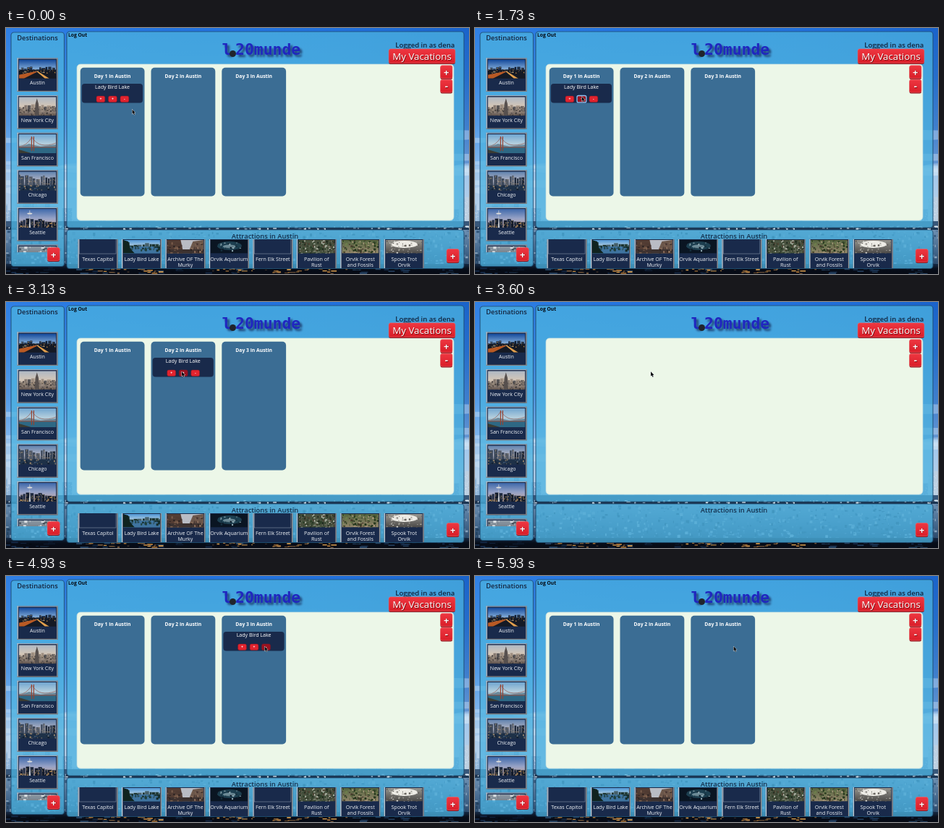
An HTML page with a canvas that plays this animation: 640x340 px, repeating every 5990 ms.

```html
<!DOCTYPE html>
<html lang="en">
<head>
<meta charset="utf-8">
<title>Trip planner</title>
<style>
html, body { margin: 0; width: 100%; height: 100%; overflow: hidden; background: #1766d2; }
canvas { display: block; width: 640px; height: 340px; }
</style>
</head>
<body>
<canvas id="stage"></canvas>
<script>
const W = 640, H = 340, LOOP = 5990;
const NAVY = '#192a4b', RED = '#e2242f', SANS = '"Open Sans", "Noto Sans", sans-serif';
const stage = document.getElementById('stage');
const scale = window.devicePixelRatio || 1;
let g;

function layer(canvas) {
  canvas.width = W * scale;
  canvas.height = H * scale;
  const c = canvas.getContext('2d');
  c.scale(scale, scale);
  return c;
}

function random(seed) {
  return () => (seed = (seed * 16807) % 2147483647) / 2147483647;
}

function rect(x, y, w, h, fill) {
  g.fillStyle = fill;
  g.fillRect(x, y, w, h);
}

function round(x, y, w, h, r, fill, stroke, line = 1) {
  g.beginPath();
  g.roundRect(x, y, w, h, r);
  if (fill) { g.fillStyle = fill; g.fill(); }
  if (stroke) { g.strokeStyle = stroke; g.lineWidth = line; g.stroke(); }
}

function shape(fill, ...pts) {
  g.beginPath();
  for (let i = 0; i < pts.length; i += 2) g.lineTo(pts[i], pts[i + 1]);
  g.closePath();
  g.fillStyle = fill;
  g.fill();
}

function oval(x, y, rx, ry, fill) {
  g.beginPath();
  g.ellipse(x, y, rx, ry, 0, 0, 7);
  g.fillStyle = fill;
  g.fill();
}

function text(s, x, y, size, fill, weight = 400, align = 'center', family = SANS) {
  g.font = `${weight} ${size}px ${family}`;
  g.textAlign = align;
  g.fillStyle = fill;
  g.fillText(s, x, y);
}

function stops(f, colors) {
  colors.forEach((c, i) => f.addColorStop(i / (colors.length - 1), c));
  return f;
}

const fade = (y0, y1, ...colors) => stops(g.createLinearGradient(0, y0, 0, y1), colors);

function clip(x, y, w, h, draw) {
  g.save();
  g.beginPath();
  g.rect(x, y, w, h);
  g.clip();
  draw();
  g.restore();
}

function towers(x, base, w, min, max, seed, colors, light) {
  const r = random(seed);
  for (let p = x; p < x + w;) {
    const bw = 2 + r() * (w > 100 ? 12 : 4), bh = min + r() * (max - min);
    rect(p, base - bh, bw, bh, colors[Math.floor(r() * colors.length)]);
    for (let k = 0; light && k < bh * bw / 14; k++)
      rect(p + r() * bw, base - r() * bh, .8, .8, light);
    p += bw + r() * 1.5;
  }
}

function specks(x, y, w, h, n, seed, colors, size = 2, flat = 1) {
  const r = random(seed);
  for (let i = 0; i < n; i++)
    rect(x + r() * w, y + r() * h, (.5 + r() * size) * flat, .5 + r() * size, colors[Math.floor(r() * colors.length)]);
}

function city() {
  rect(0, 0, W, H, fade(0, 270, '#2272de', '#3583df', '#5a9ce2', '#a3c8ec', '#bdd3e8'));
  rect(0, 0, W, 190, stops(g.createLinearGradient(0, 0, W, 0),
    ['rgba(80,160,245,.3)', 'rgba(40,120,225,0)', 'rgba(10,70,165,.35)']));
  g.globalAlpha = .4;
  const r = random(77);
  for (let i = 0; i < 26; i++) oval(r() * W, 145 + r() * 80, 20 + r() * 55, 2 + r() * 5, '#d5e6f6');
  g.globalAlpha = 1;
  towers(0, 272, W, 6, 45, 12, ['#8fb4d8', '#a9c5de', '#86a9cf', '#bdd0e2'], '#e6eef5');
  rect(0, 267, W, 12, '#38577a');
  rect(0, 276, W, 3, '#1b3552');
  specks(0, 273, W, 4, 170, 41, ['#d8e5ee', '#8ba9c2', '#20334c'], 2, 2);
  rect(0, 279, W, 61, fade(279, 340, '#6d90b2', '#41658a', '#1c3350'));
  specks(0, 280, W, 46, 900, 5, ['#56779b', '#7895b3', '#34587c', '#8aa5bd', '#24425f'], 4);
  rect(0, 326, W, 14, fade(326, 340, '#162a45', '#070d19', '#060a14'));
  specks(0, 331, W, 8, 90, 19, ['#132642', '#050911', '#24405f'], 2, 5);
  specks(110, 332, 110, 7, 22, 33, ['#a87337', '#70543a', '#d49a4c'], 1.5, 4);
  specks(285, 332, 185, 7, 36, 57, ['#a87337', '#70543a', '#d49a4c'], 1.5, 4);
}

function road(x, y, w, h) {
  rect(x, y, w, h, fade(y, y + h, '#12489a', '#7fa9d6', '#1a2234'));
  towers(x, y + 15, w, 1, 8, 8, ['#1d2d45', '#304663', '#121d30'], '#f1c67c');
  rect(x, y + 14, w, h, '#151a25');
  specks(x, y + 13, w, 6, 35, 9, ['#c58c48', '#3b506d', '#e3c08a'], 1);
  shape('#b95a25', x, y + 21, x + 24, y + 16, x + 25, y + 17, x + 7, y + h, x, y + h);
  shape('#e2a04e', x + 24, y + 16, x + 26, y + 16, x + 42, y + h, x + 36, y + h);
}

function manhattan(x, y, w, h) {
  rect(x, y, w, h, fade(y, y + h, '#aeb8c4', '#d5c7b7', '#5b4f4a'));
  towers(x, y + 20, w, 4, 10, 9, ['#82776f', '#6d6663', '#9c8d80', '#595758'], '#c7b08e');
  specks(x, y + 14, w, 13, 130, 14, ['#4a423f', '#75685e', '#92806f', '#373435']);
  shape('#57504e', x + 22, y + h, x + 23, y + 9, x + 25, y + 2, x + 27, y + 9, x + 28, y + h);
}

function bridge(x, y, w, h) {
  rect(x, y, w, h, fade(y, y + h, '#6fa5d0', '#b5cfdd', '#33718e'));
  shape('#6c8798', x, y + 18, x + 14, y + 13, x + 30, y + 17, x + w, y + 14, x + w, y + 20, x, y + 20);
  rect(x, y + 18, w, 9, '#2e6884');
  g.strokeStyle = '#8c4a3e';
  g.lineWidth = .6;
  g.beginPath();
  g.moveTo(x, y + 17);
  g.quadraticCurveTo(x + 11, y + 16, x + 18, y + 4);
  g.quadraticCurveTo(x + 28, y + 21, x + w, y + 12);
  g.stroke();
  rect(x + 17, y + 3, 1.2, 20, '#964331');
  rect(x + 20, y + 3, 1.2, 20, '#964331');
  rect(x, y + 17.5, w, 1, '#8c4a3e');
  shape('#3a3b33', x, y + h, x, y + 21, x + 17, y + h);
}

function lakefront(x, y, w, h) {
  rect(x, y, w, h, fade(y, y + h, '#5f82ae', '#b4b5c4', '#25364c'));
  towers(x, y + 20, w, 5, 16, 15, ['#202a3a', '#3b4759', '#171f2d', '#555c68'], '#d9b685');
  rect(x, y + 19, w, h, '#1e3148');
  specks(x, y + 18, w, 8, 50, 6, ['#93806a', '#3a516d', '#131f31']);
}

function needle(x, y, w, h) {
  rect(x, y, w, h, fade(y, y + h, '#3d68aa', '#96a2c6', '#d0ab98'));
  towers(x, y + h, w, 6, 14, 24, ['#1d2940', '#323c50', '#131b2b'], '#f0c674');
  specks(x, y + 19, w, 8, 60, 52, ['#10192a', '#2a3448', '#a98454']);
  shape('#c9cdd3', x + 13.8, y + h, x + 15, y + 7, x + 16.2, y + h);
  oval(x + 15, y + 6.5, 3.5, 1, '#e2e0dc');
  rect(x + 14.7, y + 2, .7, 5, '#dcdcdc');
}

function haze(x, y, w, h) {
  rect(x, y, w, h, fade(y, y + h, '#8e9aa5', '#4d5760'));
  specks(x, y, w, 12, 50, 51, ['#d5dbdf', '#434e58', '#7d8892'], 4);
}

function lake(x, y, w, h) {
  rect(x, y, w, h, fade(y, y + h, '#4f96d4', '#b8d3e6', '#2b628f'));
  towers(x, y + 9, w, 1, 6, 31, ['#46606a', '#26403d', '#1b3330']);
  rect(x, y + 9, w, h, '#3f74a0');
  specks(x, y + 8, w, 5, 50, 17, ['#162e2c', '#20413d', '#34596a'], 3);
  shape('#10231f', x, y, x + 7, y + 2, x + 10, y + 12, x + 16, y + h, x, y + h);
}

function street(x, y, w, h) {
  rect(x, y, w, h, '#b9bcc4');
  shape('#523c33', x, y, x + 19, y, x + 23, y + h, x, y + h);
  shape('#6b564a', x + w, y, x + 36, y + 2, x + 29, y + h, x + w, y + h);
  rect(x, y + 13, w, 6, '#3c3230');
  specks(x, y + 1, 19, 17, 35, 28, ['#2c2322', '#7d604e', '#463430'], 3);
  specks(x + 32, y + 4, 18, 14, 30, 38, ['#2c2322', '#8d705c', '#463430'], 3);
}

function tank(x, y, w, h) {
  rect(x, y, w, h, '#0a1522');
  oval(x + 26, y + 8, 17, 6, '#1d3f50');
  oval(x + 26, y + 9, 9, 2.5, '#6c8a96');
  specks(x + 8, y + 3, 36, 11, 26, 25, ['#0b1a28', '#8aa4ad', '#15313f']);
}

function scrap(x, y, w, h) {
  rect(x, y, w, h, '#48523f');
  specks(x, y, w, h, 190, 13, ['#202b1f', '#737a68', '#b5b8ac', '#524335', '#2b3f27'], 2.5);
}

function woods(x, y, w, h) {
  rect(x, y, w, h, fade(y, y + h, '#53643f', '#94866b'));
  specks(x, y, w, h, 150, 45, ['#25371d', '#6d7d4c', '#ab997c', '#453a2b', '#25371d'], 2.5);
}

function mist(x, y, w, h) {
  rect(x, y, w, h, fade(y, y + h, '#96958f', '#4b4947'));
  oval(x + 26, y + 6, 18, 5, '#eeece6');
  specks(x, y, w, h, 55, 37, ['#a7a49c', '#dcdad4', '#625e59'], 2);
}

function card(x, y, w, h) {
  rect(x, y, w, h, NAVY);
  rect(x, y, w, 1, '#aebccb');
  rect(x, y, 1.3, h, '#c9d3dc');
  rect(x + w - 1.3, y, 1.3, h, '#9a9795');
  rect(x, y + h - 1.2, w, 1.2, '#85817f');
}

function thumb(x, y, w, h, draw) {
  clip(x, y, w, h, () => draw(x, y, w, h));
}

function redButton(x, y, w, h, label, size, base, weight = 700) {
  round(x, y + 1, w, h, 2.5, '#8d1119');
  round(x, y, w, h - .5, 2.5, fade(y, y + h, '#ee3741', '#d91d28'), '#f0656b', .6);
  g.save();
  g.shadowColor = 'rgba(70,0,0,.7)';
  g.shadowOffsetX = g.shadowOffsetY = .8 * scale;
  text(label, x + w / 2, base, size, '#fff', weight);
  g.restore();
}

const addSight = () => redButton(609.2, 305.5, 17, 18.5, '+', 13, 319.5);

function panel(x, y, w, h) {
  round(x, y, w, h, 4, 'rgba(75,178,224,.76)', 'rgba(28,72,108,.75)', 1.2);
}

const cities = [['Austin', road], ['New York City', manhattan], ['San Francisco', bridge],
  ['Chicago', lakefront], ['Seattle', needle], ['', haze]];
const sights = [['Texas Capitol'], ['Lady Bird Lake', lake], ['Archive OF The|Murky', street],
  ['Orvik Aquarium', tank], ['Fern Elk Street'], ['Pavilion of|Rust', scrap],
  ['Orvik Forest|and Fossils', woods], ['Spook Trot|Orvik', mist]];

function page() {
  city();
  panel(7, 6, 73.5, 323.5);
  panel(84, 5, 549, 271);
  panel(84, 279, 549, 53.5);
  text('Destinations', 43.5, 17, 9.3, '#14233c', 600);
  clip(7, 30, 74, 280, () => cities.forEach(([name, draw], i) => {
    const y = 41.5 + i * 51.6;
    card(15.5, y, 56, 46.5);
    thumb(17.8, y + 2.2, 51.5, 26, draw);
    text(name, 43.5, y + 36.8, 7.1, '#f1f4f8', 500);
  }));
  redButton(57.2, 303.5, 17, 18.5, '+', 13, 317.5);
  text('Log Out', 86, 12.3, 6.7, '#050a12', 700, 'left');
  text('Logged in as dena', 620.3, 27, 9.5, '#10213a', 600, 'right');
  g.save();
  g.shadowColor = 'rgba(15,30,75,.75)';
  g.shadowBlur = 3 * scale;
  g.shadowOffsetX = g.shadowOffsetY = 3 * scale;
  const mono = '"DejaVu Sans Mono", monospace';
  text('l', 305, 36.8, 22, '#2026bf', 700, 'center', mono);
  text('20munde', 317, 36.8, 21.4, '#2026bf', 700, 'left', mono);
  g.restore();
  oval(313.5, 35.5, 4.5, 4.5, '#20242c');
  round(98, 50, 521, 216, 5, '#ecf7e8', '#bcd9de', .7);
  redButton(529.2, 28.9, 91.6, 20.2, 'My Vacations', 13.3, 43.7, 500);
  redButton(600.5, 51.7, 16.5, 18.3, '+', 13, 65.5);
  redButton(600.5, 71.3, 16.5, 18.3, '-', 13, 85);
  text('Attractions in Austin', 358, 291, 9.4, '#14304d', 600);
}

function board() {
  for (let d = 0; d < 3; d++) {
    const x = 102.7 + d * 97.8;
    round(x, 54.7, 88.8, 177.8, 5, '#3b6d94');
    text(`Day ${d + 1} in Austin`, x + 44.4, 68.6, 6.8, '#fff', 700);
  }
  clip(84, 292, 549, 40, () => sights.forEach(([name, draw], i) => {
    const x = 99.5 + i * 60.45;
    card(x, 285, 55, 54);
    if (draw) thumb(x + 2, 293, 51, 18.5, draw);
    else {
      g.strokeStyle = '#8492a6';
      g.lineWidth = .6;
      g.strokeRect(x + 2, 285, 50.5, 27);
    }
    name.split('|').forEach((s, k) => text(s, x + 27.5, 321.5 + k * 8.3, 7.1, '#f1f4f8', 500));
  }));
}

// Day columns and attractions vanish while the plan reloads.
const reloads = [[1800, 2130], [3430, 3760], [5270, 5600]];
const presses = [[1600, 1800], [3250, 3430], [5100, 5270]];
const path = [[0, 174.5, 112.5], [130, 174.5, 112.5], [670, 147, 101], [1100, 147, 101],
  [1500, 147.5, 94.8], [1800, 147.5, 94.8], [2100, 146.5, 98], [2600, 146.5, 98],
  [3100, 243, 96.3], [3800, 243, 96.3], [4500, 357.5, 97.3], [LOOP, 357.5, 97.3]];

function pointer(t) {
  let i = 1;
  while (path[i][0] < t) i++;
  const [t0, x0, y0] = path[i - 1], [t1, x1, y1] = path[i];
  const u = (t - t0) / (t1 - t0), e = u * u * (3 - 2 * u);
  return [x0 + (x1 - x0) * e, y0 + (y1 - y0) * e];
}

const within = (t, [a, b]) => t >= a && t < b;

function activity(day, t, mx, my) {
  const dx = day * 97.8;
  round(104.8 + dx, 77, 84.2, 26.5, 4, NAVY);
  text('Lady Bird Lake', 147 + dx, 84.3, 7.1, '#fff', 500);
  const pressed = within(t, presses[day]);
  ['+', '+', '-'].forEach((s, i) => {
    const x = 125 + i * 16.5 + dx;
    const over = mx > x && mx < x + 12 && my > 93.5 && my < 100;
    round(x, 94, 11.8, 8.4, 2, over ? '#9c1220' : RED, '#8a1420', .5);
    text(s, x + 5.9, 100.2, 5, '#fff', 700);
    if (over && pressed) round(x - .5, 93.5, 12.8, 9.4, 2, null, '#8fc3f5', 1.3);
  });
}

function cursor(x, y) {
  g.beginPath();
  [[0, 0], [0, 6.3], [1.4, 5], [2.5, 7.4], [3.6, 6.9], [2.6, 4.6], [4.4, 4.4]]
    .forEach(([a, b]) => g.lineTo(x + a, y + b));
  g.closePath();
  g.lineWidth = .9;
  g.strokeStyle = '#eef2f6';
  g.stroke();
  g.fillStyle = '#0a0c10';
  g.fill();
}

function cache(...parts) {
  const c = document.createElement('canvas');
  g = layer(c);
  parts.forEach(p => p());
  return c;
}

const empty = cache(page, addSight);
const full = cache(page, board, addSight);
const screen = layer(stage);

function frame(now) {
  const t = now % LOOP, [mx, my] = pointer(t);
  const loading = reloads.some(r => within(t, r));
  const day = reloads.filter(r => t >= r[0]).length;
  g = screen;
  g.drawImage(loading ? empty : full, 0, 0, W, H);
  if (!loading && day < 3) activity(day, t, mx, my);
  cursor(mx, my);
}

const start = performance.now();
function tick() {
  frame(performance.now() - start);
  requestAnimationFrame(tick);
}
tick();
</script>
</body>
</html>
```
